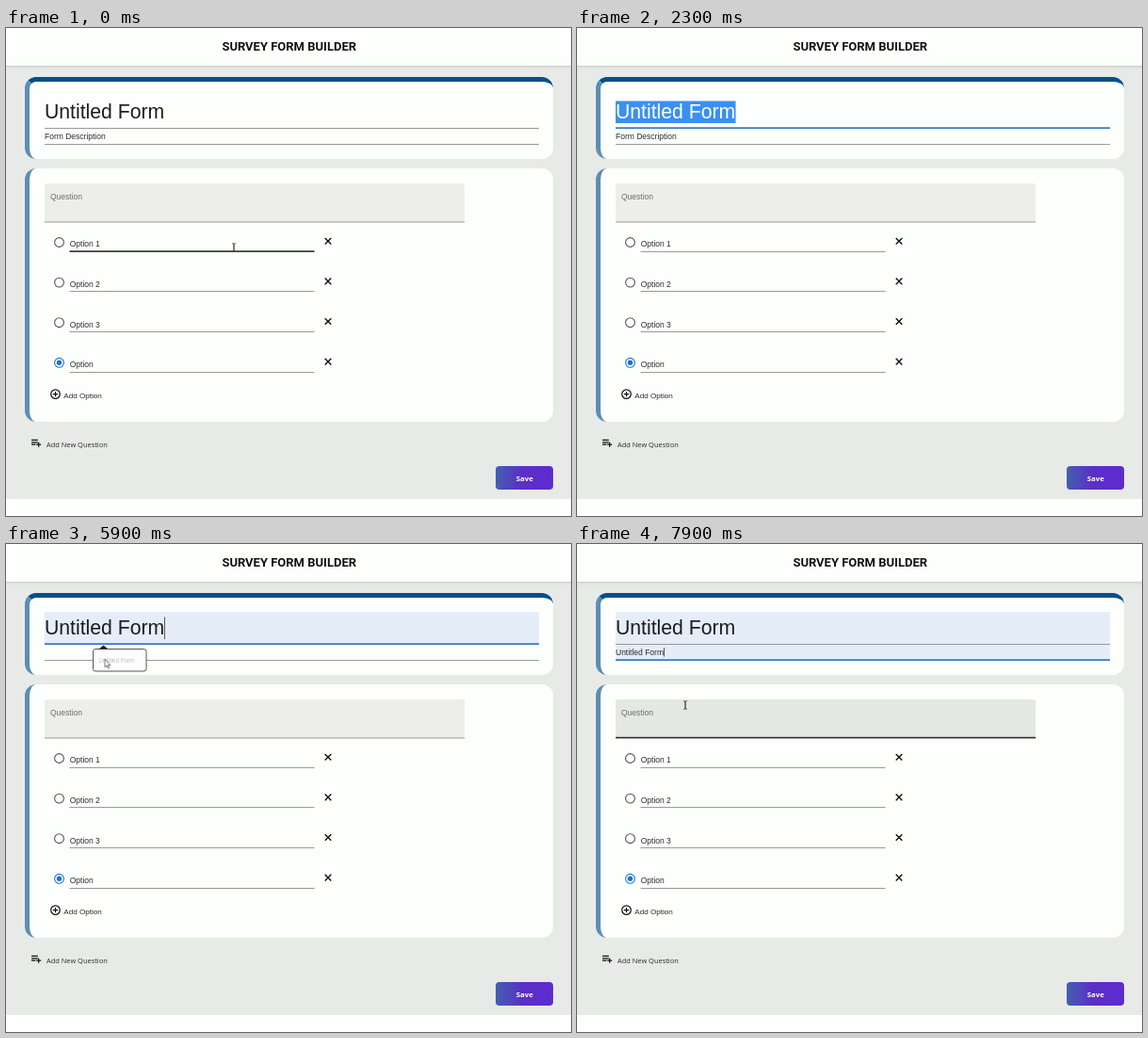
Write an HTML page that moves like this. It is 600 by 518 pixels and loops after 8000 ms.

```html
<!DOCTYPE html>
<html lang="en">
<head>
<meta charset="utf-8">
<title>Survey form builder</title>
<style>
  html, body { margin: 0; width: 100%; height: 100%; overflow: hidden; background: #fdfffd; }
  #stage { position: relative; width: 600px; height: 518px; overflow: hidden; }
  #stage > * { position: absolute; box-sizing: border-box; }
  .page { top: 40px; width: 600px; height: 460px; background: linear-gradient(#cbcdcb, #e0e2e0 2px, #e8eae8 4px); }
  .card { left: 20px; width: 561px; background: #fdfffd; border-left: 5px solid #5a8fb4; border-radius: 12px; }
  .head { top: 52px; height: 87px; border-top: 5px solid #00508c; }
  .body { top: 149px; height: 269px; }
  .save { left: 520px; top: 465px; width: 61px; height: 25px; border-radius: 4px;
    background: linear-gradient(90deg, #4260ae, #5a30c8 45%, #5e2ad0); }
  svg { left: 0; top: 0; }
  text { font: 8.5px "Liberation Sans", Arial, sans-serif; fill: #2b2b2b; white-space: pre; }
  .big { font-size: 21.2px; fill: #1c1c1c; }
  .white { fill: #fff; }
  .icon { fill: none; stroke: #111; stroke-width: 1.2; }
</style>
</head>
<body>
<div id="stage">
  <div class="page"></div>
  <div class="card head"></div>
  <div class="card body"></div>
  <div class="save"></div>
  <svg id="svg" width="600" height="518"></svg>
</div>
<script>
const svg = document.getElementById('svg');
const LOOP = 8000, LEFT = 41, WIDTH = 525;

function add(tag, attrs, text = '', parent = svg) {
  const node = document.createElementNS('http://www.w3.org/2000/svg', tag);
  set(node, attrs);
  node.textContent = text;
  return parent.appendChild(node);
}
function set(node, attrs) {
  for (const key in attrs) node.setAttribute(key, attrs[key]);
}
const show = (node, on) => set(node, { visibility: on ? 'visible' : 'hidden' });
const rect = (x, y, width, height, fill) => add('rect', { x, y, width, height, fill });
const label = (x, y, text, style = '', cls = '') => add('text', { x, y, style, class: cls }, text);
const icon = (d, attrs = {}) => add('path', { d, class: 'icon', ...attrs });

// Underline that thickens on hover and fills blue from its centre on focus
function underline(x, y, width) {
  const line = rect(x, y, width, 1, '#999b99');
  const blue = rect(x, y - 0.7, 0, 1.6, '#2e76c9');
  return (hover, focus = 0) => {
    set(line, hover ? { y: y - 0.7, height: 1.6, fill: '#2c2e2c' } : { y, height: 1, fill: '#999b99' });
    set(blue, { x: x + width * (1 - focus) / 2, width: width * focus });
  };
}

// Text field with autofill tint, selection and caret
function field(id, top, bottom, baseline, caretTop, caretHeight, cls) {
  const tint = rect(LEFT, top, WIDTH, bottom - top, '#e5edf9');
  const text = label(LEFT, baseline, '', '', cls);
  const mark = rect(LEFT, caretTop, 0, caretHeight, '#3a90f2');
  const clip = add('rect', { x: LEFT, y: caretTop, height: caretHeight }, '',
    add('clipPath', { id }));
  const marked = label(LEFT, baseline, '', '', cls + ' white');
  set(marked, { 'clip-path': `url(#${id})` });
  const caret = rect(LEFT, caretTop, 0.8, caretHeight, '#333');
  const line = underline(LEFT, bottom, WIDTH);
  return s => {
    text.textContent = marked.textContent = s.text;
    show(tint, s.filled);
    const from = s.selected ?? s.end, width = s.end - from;
    for (const box of [mark, clip]) set(box, { x: from, width });
    set(caret, { x: s.caret });
    show(caret, s.caretOn && width <= 0);
    line(s.hover, s.focus);
  };
}

label(300.7, 23.7, 'SURVEY FORM BUILDER', 'font:700 13px Roboto,sans-serif;text-anchor:middle;fill:#111');
const drawTitle = field('titleClip', 72, 106, 96.3, 77.5, 23.5, 'big');
const drawAbout = field('aboutClip', 107, 123, 117.7, 110, 9.5, '');

const question = add('path', { d: 'M41 206V167q0-2 2-2H485q2 0 2 2V206z' });
label(47, 182, 'Question', 'fill:#6d6f6d');
const questionLine = underline(41, 205.5, 446);

const optionLines = ['Option 1', 'Option 2', 'Option 3', 'Option'].map((name, i) => {
  const y = 227.5 + i * 42.6, checked = i === 3;
  add('circle', { cx: 56.5, cy: y, r: 4.9, fill: 'none', stroke: checked ? '#1f72d0' : '#555', 'stroke-width': 1.1 });
  if (checked) add('circle', { cx: 56.5, cy: y, r: 2.7, fill: '#1f72d0' });
  label(67.7, y + 4.8, name);
  icon(`M338.7 ${y - 4.5}l6.6 6.6m0-6.6l-6.6 6.6`, { style: 'stroke-width:1.4' });
  return underline(67.5, Math.round(y + 9.3), 260);
});

add('circle', { cx: 52.5, cy: 388.6, r: 4.8, class: 'icon' });
icon('M49.8 388.6h5.4m-2.7-2.7v5.4');
label(61.3, 392.8, 'Add Option', 'font-size:8.1px');
icon('M27 437.4h6.8M27 439.8h6.8M27 442.2h4.4M32.2 442.2h5m-2.5-2.5v5');
label(43, 444.8, 'Add New Question', 'font:7.45px "Open Sans",sans-serif');
label(550.8, 481, 'Save', 'font:700 7.8px "Open Sans",sans-serif;text-anchor:middle;fill:#fff');

const popup = add('g', {});
add('rect', { x: 92.5, y: 111.5, width: 56.5, height: 23.5, rx: 2.5, fill: '#fdfffd', stroke: '#555' }, '', popup);
add('path', { d: 'M98.5 111.5l5-4 5 4z', fill: '#222' }, '', popup);
add('text', { x: 98.3, y: 126, style: 'font-size:6.4px;fill:#bcbcbc' }, 'Untitled Form', popup);

const beam = icon('M-2-4.2h1.3q.7 0 .7.7v7q0 .7-.7.7H-2M2-4.2H.7Q0-4.2 0-3.5v7q0 .7.7.7H2', { style: 'stroke:#444;stroke-width:.9' });
const arrow = add('path', { d: 'M0 0v8.5l2-1.8 1.4 3 1.2-.6-1.3-2.8h2.6z', fill: '#fff', stroke: '#222', 'stroke-width': 0.6 });

// Pointer stops: time, x, y
const stops = [
  [0, 242, 233], [1200, 167, 100], [1500, 167, 98], [2200, 41, 92], [3200, 41, 98],
  [3600, 82, 117], [3800, 104, 118], [4000, 105, 117], [4300, 41, 117], [4500, 50, 112],
  [4900, 91, 97], [5300, 91, 97], [5800, 105, 122], [6100, 105, 123], [6500, 105, 120],
  [6600, 105, 120], [6900, 110, 140], [7200, 111, 141], [7700, 115, 171], [8000, 115, 171]
];
function pointerAt(t) {
  const i = stops.findIndex(s => s[0] > t);
  const [t0, x0, y0] = stops[i - 1], [t1, x1, y1] = stops[i];
  const u = (t - t0) / (t1 - t0), k = u * u * (3 - 2 * u);
  return [x0 + (x1 - x0) * k, y0 + (y1 - y0) * k];
}

// cubic-bezier(0, 0, .2, 1) over 200 ms
function easeOut(ms) {
  const x = Math.min(Math.max(ms / 200, 0), 1);
  let lo = 0, hi = 1;
  for (let i = 0; i < 20; i++) {
    const s = (lo + hi) / 2;
    if (0.6 * s * s + 0.4 * s ** 3 < x) lo = s; else hi = s;
  }
  return 3 * lo * lo - 2 * lo ** 3;
}

const focusTimes = [1284, 3653, 4882, 6534]; // title and description in turn

function draw(t) {
  const [x, y] = pointerAt(t);
  const between = (a, b) => t >= a && t < b;
  const [f0, f1, f2, f3] = focusTimes.map(f => easeOut(t - f));
  const focused = focusTimes.filter(f => f <= t);
  const blinkOn = focused.length > 0 && Math.floor((t - focused.at(-1)) / 500) % 2 === 0;
  const onTitle = focused.length % 2 === 1;
  const visible = !between(2200, 3300);
  const titlePopup = between(4900, 6100), aboutPopup = between(6500, 7200);
  const onPopup = titlePopup && y > 110 || aboutPopup && y > 127;
  const over = (x0, x1, y0, y1) => visible && !onPopup && x >= x0 && x < x1 && y >= y0 && y < y1;

  const titleFilled = t >= 5800, titleShown = t < 3200 || titleFilled;
  drawTitle({
    text: titleShown ? 'Untitled Form' : '',
    filled: titleFilled,
    end: 168.5,
    selected: between(1600, 3200) ? Math.max(LEFT, x) : undefined,
    caret: titleShown ? 168 : LEFT,
    caretOn: onTitle && blinkOn,
    hover: over(41, 566, 72, 107),
    focus: f0 - f1 + f2 - f3
  });

  const aboutFilled = t >= 7000, aboutShown = t < 4500;
  drawAbout({
    text: aboutShown ? 'Form Description' : aboutFilled ? 'Untitled Form' : '',
    filled: aboutFilled,
    end: 105.7,
    selected: between(4100, 4500) ? (t < 4300 ? Math.max(LEFT, x) : LEFT) : undefined,
    caret: aboutShown ? 82 : aboutFilled ? 92 : LEFT,
    caretOn: focused.length > 0 && !onTitle && blinkOn,
    hover: over(41, 566, 107, 124),
    focus: f1 - f2 + f3
  });

  const onQuestion = over(41, 487, 165, 206);
  set(question, { fill: onQuestion ? '#e5e7e4' : '#edeeec' });
  questionLine(onQuestion);
  optionLines.forEach((line, i) => line(over(67, 328, 219 + i * 42.6, 239 + i * 42.6)));

  show(popup, titlePopup || aboutPopup);
  set(popup, { transform: `translate(0 ${aboutPopup ? 17 : 0})` });

  const inText = onQuestion || over(41, 566, 72, 124) || over(67, 328, 219, 239);
  for (const c of [beam, arrow]) set(c, { transform: `translate(${x} ${y})` });
  show(beam, visible && inText);
  show(arrow, visible && !inText);
}

function tick() {
  draw(Math.floor(performance.now() % LOOP / 100) * 100);
  requestAnimationFrame(tick);
}
tick();
</script>
</body>
</html>
```
